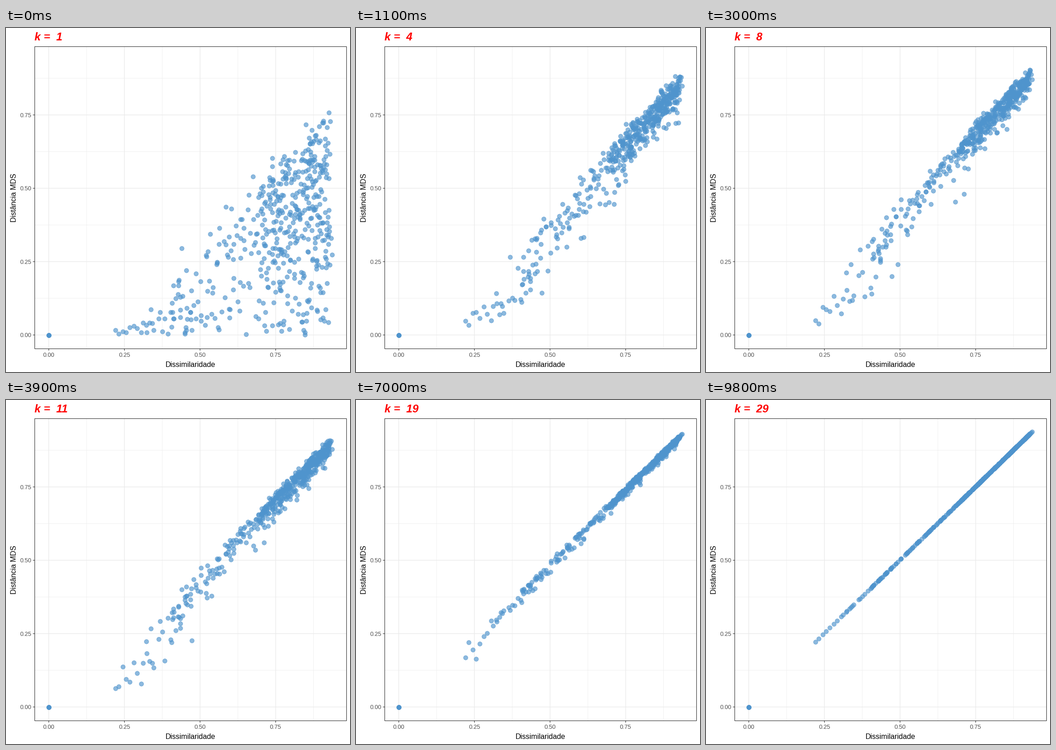
A matplotlib script that plays this animation: 748x748 px, repeating every 10 s.

```python
import numpy as np
import matplotlib.pyplot as plt
from matplotlib.animation import FuncAnimation

SIZE, DPI = 748, 64
PX = 72 / DPI                      # points per pixel
FRAMES, INTERVAL = 100, 100
LAST_K, FULL_K = 29, 28            # nothing is left to explain after FULL_K
X0, XS = 93.0, 657.9               # pixel of zero and pixels per unit
Y0, YS = 667.5, 638.0
LEFT, RIGHT, TOP, BOTTOM = 62.5, 740.5, 40.5, 697.5
PAIRS, ZEROS = 496, 6

plt.rcParams["font.family"] = "Liberation Sans"
rng = np.random.default_rng(29)


def dissimilarities():
    """Spread the pairs along a cumulative curve with a little jitter."""
    count = [0, 7, 20, 48, 56, 77, 108, 119, 180, 240, 330, 420, PAIRS - 1]
    value = [.22, .305, .40, .475, .51, .58, .66, .695,
             .745, .78, .845, .89, .93]
    x = np.interp(np.arange(PAIRS), count, value)
    x[1:] += rng.normal(0, .004, PAIRS - 1)
    return np.minimum(x, .937)


def mean_tail(k):
    """Average squared distance left unexplained by k dimensions."""
    return .2 * (1 - (k - 1) / (FULL_K - 1)) ** 2


def distances(x):
    """Fitted distance of each pair for k = 1 .. LAST_K."""
    total = (x[:, None] + .002) ** 2
    dims = np.arange(5, FULL_K + 1)
    parts = (mean_tail(dims - 1) - mean_tail(dims)) \
        * rng.chisquare(1, (x.size, dims.size))
    tail = np.cumsum(parts[:, ::-1], axis=1)[:, ::-1]
    # soft minimum, so that short pairs keep a positive distance
    cap = total * rng.uniform(.92, 1, total.shape)
    tail = tail * cap / (tail ** 4 + cap ** 4) ** .25
    squares = total - tail         # k = 4 .. FULL_K - 1

    # the first dimensions share what is explained at k = 4
    even = rng.random(x.size)
    bulge = rng.beta(6, 2.5, x.size)
    v = np.where((x > .68) & (rng.random(x.size) < .35), bulge, even)
    v = np.where(x < .52, v ** 1.3, v)
    s1 = (.92 * v) ** 2
    s2 = s1 + (1 - s1) * rng.random(x.size) ** .6
    s3 = s2 + (1 - s2) * rng.random(x.size) ** .5
    head = squares[:, :1] * np.column_stack([s1, s2, s3])
    ends = np.repeat(total, LAST_K - FULL_K + 1, axis=1)
    return np.sqrt(np.hstack([head, squares, ends]))


def start_of(k):
    if k == 1:
        return 0
    return 4 * k - 5 if k <= 15 else 3 * k + 11


x = dissimilarities()
y = distances(x)
order = rng.permutation(PAIRS)
px = X0 + XS * np.append(x[order], np.zeros(ZEROS))
py = Y0 - YS * np.vstack([y[order], np.zeros((ZEROS, LAST_K))])
starts = [start_of(k) for k in range(1, LAST_K + 1)]

fig = plt.figure(figsize=(SIZE / DPI, SIZE / DPI), dpi=DPI, facecolor="white")
ax = fig.add_axes([0, 0, 1, 1])
ax.set_xlim(0, SIZE)
ax.set_ylim(SIZE, 0)
ax.axis("off")


def line(xs, ys, color, width, z):
    ax.plot(xs, ys, color=color, lw=width * PX, zorder=z, snap=False,
            solid_capstyle="butt", solid_joinstyle="miter")


def label(x, y, text, size, color="black", **kw):
    return ax.text(x, y, text, fontsize=size * PX, color=color,
                   va="baseline", **kw)


for i in range(4):
    gx, gy = X0 + XS * i / 4, Y0 - YS * i / 4
    mx, my = gx + XS / 8, gy - YS / 8
    line([mx, mx], [TOP, BOTTOM], "#ebebeb", .7, 1)
    line([LEFT, RIGHT], [my, my], "#ebebeb", .7, 1)
    line([gx, gx], [TOP, BOTTOM], "#ebebeb", 1.4, 2)
    line([LEFT, RIGHT], [gy, gy], "#ebebeb", 1.4, 2)
    line([gx, gx], [BOTTOM, BOTTOM + 4], "#333333", 1.16, 4)
    line([LEFT - 4, LEFT], [gy, gy], "#333333", 1.16, 4)
    tick = f"{i / 4:.2f}"
    label(gx, 715.3, tick, 12.8, "#4d4d4d", ha="center")
    label(55.3, gy + 4.8, tick, 12.8, "#4d4d4d", ha="right")

line([LEFT, RIGHT, RIGHT, LEFT, LEFT], [TOP, TOP, BOTTOM, BOTTOM, TOP],
     "#333333", 1.1, 5)
label(401.2, 736.8, "Dissimilaridade", 16, ha="center")
label(22, 368.5, "Distância MDS", 16, ha="center", rotation=90,
      rotation_mode="anchor")
title = label(62.5, 27, "", 24, "red", ha="left", weight="bold",
              style="italic")

BLUE = (79 / 255, 148 / 255, 205 / 255, .65)
dots = ax.scatter(px, py[:, 0], s=(9.48 * PX) ** 2, facecolor=[BLUE],
                  edgecolor=[BLUE], linewidth=.945 * PX, zorder=3)


def draw(frame):
    k = sum(s <= frame for s in starts)
    now = py[:, k - 1]
    if k < LAST_K and starts[k] == frame + 1:
        now = (now + py[:, k]) / 2     # halfway to the next state
    dots.set_offsets(np.column_stack([px, now]))
    title.set_text(f"k =  {k}")
    return dots, title


anim = FuncAnimation(fig, draw, frames=FRAMES, interval=INTERVAL,
                     repeat=True, repeat_delay=0)
plt.show()
```
